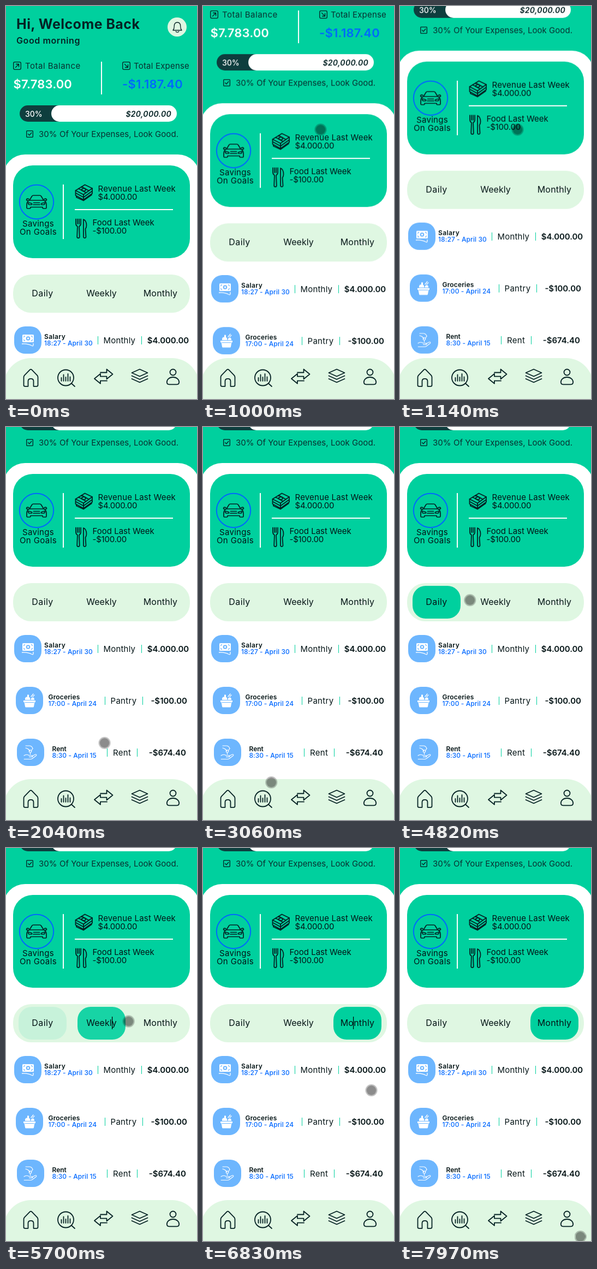
Animation of 350x720 px, one loop 8 s. Source, as an HTML page:

```html
<!DOCTYPE html>
<html lang="en">
<head>
<meta charset="utf-8">
<title>Budget app</title>
<style>
html, body { margin: 0; width: 100%; height: 100%; overflow: hidden; background: #fff; }
svg { display: block; width: 100vw; height: 100vh; }
text { font: 400 15px Inter, "Open Sans", sans-serif; font-optical-sizing: none; fill: #041416; white-space: pre; }
.mid { text-anchor: middle; }
.end { text-anchor: end; }
.semi { font-weight: 600; }
.title { font-size: 25px; font-weight: 700; fill: #052224; }
.sub { font-size: 16px; font-weight: 600; fill: #052224; }
.head { fill: #093030; }
.sum { font-size: 22px; font-weight: 600; fill: #fff; }
.tab { font-size: 16px; }
.name { font-size: 12px; font-weight: 600; }
.date { font-size: 12px; font-weight: 500; fill: #0068ff; }
.line { fill: none; stroke: #052224; stroke-width: 1.8; stroke-linecap: round; stroke-linejoin: round; }
.thin { stroke-width: 1.3; }
.white { stroke: #fff; stroke-width: 1.3; }
.blue { fill: #6db6fe; }
.sep { stroke: #00d09e; stroke-width: 1; }
.rule { stroke: #fff; stroke-width: 2; }
.pick { fill: #00d09e; opacity: 0; }

.page, .pick, .caret, .dot, .dot circle { animation: 8s linear infinite; }
.page { animation-name: scroll; }
.daily { animation-name: daily; }
.weekly { animation-name: weekly; }
.monthly { animation-name: monthly; }
.caret { animation-name: blink; animation-timing-function: step-end; }
.dot { animation-name: move; }
.dot circle { animation-name: show; animation-timing-function: step-end; }

@keyframes scroll {
  0%, 10.9% { transform: translateY(0); }
  11.625% { transform: translateY(-35px); }
  12.5% { transform: translateY(-93px); }
  13.375% { transform: translateY(-150px); }
  14.25% { transform: translateY(-190px); }
  15.125%, 100% { transform: translateY(-206px); }
}
@keyframes daily {
  0% { opacity: 0; }
  51% { opacity: 0; animation-timing-function: cubic-bezier(.215, .61, .355, 1); }
  56% { opacity: 1; }
  68.6% { opacity: 1; animation-timing-function: cubic-bezier(.215, .61, .355, 1); }
  73.6%, 100% { opacity: 0; }
}
@keyframes weekly {
  0% { opacity: 0; }
  68.6% { opacity: 0; animation-timing-function: cubic-bezier(.215, .61, .355, 1); }
  73.6% { opacity: 1; }
  80.9% { opacity: 1; animation-timing-function: cubic-bezier(.215, .61, .355, 1); }
  85.3%, 100% { opacity: 0; }
}
@keyframes monthly {
  0% { opacity: 0; }
  80.9% { opacity: 0; animation-timing-function: cubic-bezier(.215, .61, .355, 1); }
  85.3%, 100% { opacity: 1; }
}
@keyframes blink {
  0% { opacity: 0; transform: translateX(84px); }
  51.3% { opacity: 1; transform: translateX(84px); }
  57.5% { opacity: 0; transform: translateX(84px); }
  63.8% { opacity: 1; transform: translateX(84px); }
  68.6% { opacity: 1; transform: translateX(194px); }
  74.9% { opacity: 0; transform: translateX(194px); }
  80.9% { opacity: 1; transform: translateX(275px); }
  87.1% { opacity: 0; transform: translateX(275px); }
  93.4% { opacity: 1; transform: translateX(275px); }
  99.6%, 100% { opacity: 0; transform: translateX(275px); }
}
@keyframes show {
  0% { opacity: 0; }
  .85%, 100% { opacity: 1; }
}
@keyframes move {
  0% { transform: translate(310.5px, 646.5px); }
  .875% { transform: translate(310.5px, 646.5px); animation-timing-function: ease-in-out; }
  8.375% { transform: translate(215.5px, 226.5px); }
  19.8% { transform: translate(215.5px, 226.5px); animation-timing-function: cubic-bezier(.4, 0, .8, .8); }
  25.5% { transform: translate(181px, 578px); }
  27.6% { transform: translate(115px, 711px); }
  29.9% { transform: translate(11px, 692px); }
  32.5% { transform: translate(3px, 688px); animation-timing-function: ease-in-out; }
  40.1% { transform: translate(142px, 646px); animation-timing-function: ease-in-out; }
  47% { transform: translate(77px, 315px); }
  48.5% { transform: translate(85.5px, 316px); }
  55% { transform: translate(85.5px, 316px); animation-timing-function: ease-in-out; }
  66.9% { transform: translate(192px, 319px); }
  68.6% { transform: translate(194px, 319px); }
  70.4% { transform: translate(221px, 318px); }
  71.25% { transform: translate(224.5px, 317.5px); animation-timing-function: ease-out; }
  79.4% { transform: translate(277px, 320px); }
  81% { transform: translate(277px, 320px); animation-timing-function: ease-in; }
  85.375% { transform: translate(308.5px, 443px); animation-timing-function: ease-out; }
  91.25% { transform: translate(316px, 698px); }
  92% { transform: translate(330px, 709px); }
  92.9% { transform: translate(336px, 714px); }
  93.75%, 98.6% { transform: translate(331.5px, 716px); }
  99.6%, 100% { transform: translate(330.5px, 712px); }
}
</style>
</head>
<body>
<svg viewBox="0 0 350 720">
  <g class="page">
    <rect y="-1" width="350" height="400" fill="#00d09e"/>

    <!-- header -->
    <text class="title" x="19" y="42" letter-spacing=".45">Hi, Welcome Back</text>
    <text class="sub" x="19" y="69" letter-spacing=".6">Good morning</text>
    <circle cx="313.5" cy="38.5" r="17.5" fill="#dff7e2"/>
    <path class="line thin" d="M306 44.5c2-2.2 2.3-4.2 2.3-7.5 0-4.3 2.3-7 5.7-7s5.7 2.7 5.7 7c0 3.300.3 5.300 2.300 7.500zM311.300 46.500c.6 2.200 4.800 2.200 5.400 0"/>

    <g class="line thin">
      <rect x="13.700" y="102.700" width="13.600" height="13.600" rx="2.500"/>
      <path d="M17.500 112.500l6-6M18.500 106.500h5v5"/>
      <rect x="213.700" y="102.700" width="13.600" height="13.600" rx="2.500"/>
      <path d="M217.500 106.500l6 6M218.500 112.500h5v-5"/>
      <rect x="37.700" y="228.700" width="11.600" height="11.600" rx="1"/>
      <path d="M40.500 234.500l2.300 2.300 4-4.500"/>
    </g>
    <text class="head" x="35" y="115" letter-spacing=".5">Total Balance</text>
    <text class="head" x="234" y="115" letter-spacing=".2">Total Expense</text>
    <text class="sum" x="13.500" y="151" letter-spacing=".15">$7.783.00</text>
    <text class="sum" x="213" y="151" letter-spacing=".25" style="fill:#0068ff">-$1.187.40</text>
    <path class="rule" d="M175 102v60"/>

    <rect x="25" y="182" width="120" height="30" rx="15" fill="#0e3e3e"/>
    <rect x="83" y="182" width="230" height="30" rx="15" fill="#fff"/>
    <text x="35" y="203" style="font-size:14px;font-weight:500;fill:#fff">30%</text>
    <text class="end" x="303" y="203" letter-spacing=".3" style="font-size:14px;font-weight:600;font-style:italic;fill:#052224">$20,000.00</text>
    <text class="head" x="60" y="240" letter-spacing=".05">30% Of Your Expenses, Look Good.</text>

    <!-- sheet -->
    <rect x="-5" y="272" width="360" height="760" rx="40" fill="#fff"/>
    <rect x="13" y="292" width="324" height="170" rx="36" fill="#00d09e"/>
    <circle cx="56" cy="359" r="31.200" fill="none" stroke="#0068ff" stroke-width="2"/>
    <g class="line" style="stroke-width:1.700">
      <path d="M43 356l4.500-7.500c.7-1.200 1.500-1.500 2.800-1.500h11.400c1.300 0 2.100.3 2.800 1.500l4.500 7.500M43 356h26M43 356c-4 1.500-5 4-5 8v5.500c0 1 .5 1.500 1.500 1.500h4c1 0 1.500-.6 1.500-1.500v-1h22v1c0 .9.5 1.500 1.500 1.500h4c1 0 1.500-.5 1.500-1.500v-5.500c0-4-1-6.500-5-8"/>
      <path d="M42 354c-2-1.500-4.500-1-4.500 1 0 1 1.500 1.500 3 1.500M70 354c2-1.500 4.500-1 4.500 1 0 1-1.500 1.500-3 1.500M40.500 360l6 1.500c1.500.5 1.500 2.500 0 2.500h-3.500c-1.500 0-2.500-2-2.500-4zM71.500 360l-6 1.500c-1.500.5-1.500 2.500 0 2.500h3.500c1.500 0 2.500-2 2.500-4zM50 364h12M50.500 360.500h11"/>
    </g>
    <text class="mid" x="59" y="404" letter-spacing=".3">Savings</text>
    <text class="mid" x="59" y="419" letter-spacing=".4">On Goals</text>
    <path class="rule" d="M105 327v100M126 373h180"/>

    <g class="line">
      <path d="M127.500 338l17-10.500 13.500 6.500-16 11.500zM133 334.500l13.500 7.500M138.500 331l13.500 7.500"/>
      <ellipse cx="142.500" cy="336.500" rx="3.600" ry="2.400"/>
      <path d="M127.500 338v4.500l14.500 8 16-11.500v-5M127.500 342.500v4.500l14.500 8 16-11.500v-4.500M142 345.500v9.500M129 348v2.500l13 6 15-10.500"/>
      <path d="M128 390.500v8c0 3 1.300 4.500 3 5.500l-.8 18.500c0 3.500 4.600 3.500 4.600 0l-.8-18.500c1.700-1 3-2.500 3-5.500v-8M131 390.500v8.500M134 390.500v8.500M142 391c4 1.500 5.500 6 5.500 11 0 3-.8 5-2 6.500l1 14c.2 3.300-4.700 3.300-4.500 0z"/>
    </g>
    <text x="168.500" y="340" letter-spacing=".2">Revenue Last Week</text>
    <text x="168.500" y="355" letter-spacing="-.2">$4.000.00</text>
    <text x="158.500" y="402">Food Last Week</text>
    <text x="158.500" y="417" letter-spacing="-.2">-$100.00</text>

    <!-- period tabs -->
    <rect x="13" y="492" width="324" height="70" rx="33" fill="#dff7e2"/>
    <rect class="pick daily" x="23" y="497" width="88" height="60" rx="24"/>
    <rect class="pick weekly" x="131" y="497" width="88" height="60" rx="24"/>
    <rect class="pick monthly" x="239" y="497" width="88" height="60" rx="24"/>
    <text class="tab mid" x="67" y="532" letter-spacing=".4">Daily</text>
    <text class="tab mid" x="175" y="532">Weekly</text>
    <text class="tab mid" x="283" y="532" letter-spacing=".2">Monthly</text>
    <rect class="caret" y="515" width="1.200" height="23" fill="#000"/>

    <!-- entries -->
    <g>
      <rect class="blue" x="15" y="587" width="50" height="50" rx="20"/>
      <rect x="30" y="602" width="21" height="14" rx="1.500" fill="#fff"/>
      <circle class="blue" cx="40.500" cy="609" r="3.800"/>
      <circle cx="40.500" cy="609" r="1.800" fill="#fff"/>
      <path class="line" style="stroke:#6db6fe;stroke-width:1.200" d="M32.500 606.500l2-2M48.500 606.500l-2-2M32.500 611.500l2 2M48.500 611.500l-2 2"/>
      <path class="line white" d="M29.500 619c7-.5 12 0 18 3.500 1.500.7 2.500 0 2.500-1.500v-2.500"/>
      <text class="name" x="70" y="610" letter-spacing=".4">Salary</text>
      <text class="date" x="70" y="622" letter-spacing=".08">18:27 - April 30</text>
      <path class="sep" d="M168.500 605v15M248.500 605v15"/>
      <text x="178.500" y="618" letter-spacing=".2">Monthly</text>
      <text class="semi end" x="335" y="618" letter-spacing="-.1">$4.000.00</text>
    </g>
    <g>
      <rect class="blue" x="18" y="682" width="50" height="50" rx="20"/>
      <path d="M32 707h22v3h-1.500l-1.500 8c-.2 1-.8 1.500-1.800 1.500h-12.400c-1 0-1.600-.5-1.800-1.500l-1.500-8h-1.500zM35 706c-.5-4 1.500-6 4-5.500v-4h3v4c2 1 2.500 3 2.500 5.500zM45.500 706c0-3.500 2-5 4-4.500 2 .5 2.500 2 2.500 4.500z" fill="#fff"/>
      <path class="line white" d="M46 700l4-5M49 700l3-3"/>
      <path class="line" style="stroke:#6db6fe;stroke-width:1" d="M35 710.500h16"/>
      <text class="name" x="77.500" y="705" letter-spacing=".15">Groceries</text>
      <text class="date" x="77.500" y="717" letter-spacing=".08">17:00 - April 24</text>
      <path class="sep" d="M181.500 700v15M250.500 700v15"/>
      <text x="191.500" y="713" letter-spacing=".3">Pantry</text>
      <text class="semi end" x="332" y="713">-$100.00</text>
    </g>
    <g>
      <rect class="blue" x="20" y="777" width="50" height="50" rx="20"/>
      <g class="line white" style="stroke-width:1.100">
        <path d="M33 808c4-3 7-2 10 0h4.500c2 0 2 2.500 0 2.500h-5M47.500 809l6-3c2-.8 3.200.8 1.700 2.200l-7 5.300c-1 .8-2 1-3.500 1h-11.500M36 790h6.500c3.500 0 5.500 2 6.500 5M36 794l4 1.500 4 4"/>
        <circle cx="44.500" cy="800" r="2.200"/>
        <path d="M44.500 802.500v3.500M49 795l-2.500 4"/>
      </g>
      <text class="name" x="84.500" y="800">Rent</text>
      <text class="date" x="84.500" y="812" letter-spacing=".05">8:30 - April 15</text>
      <path class="sep" d="M185.500 795v15M240.500 795v15"/>
      <text x="196" y="808" letter-spacing=".3">Rent</text>
      <text class="semi end" x="330" y="808">-$674.40</text>
    </g>
  </g>

  <!-- bottom bar -->
  <rect x="-4" y="645" width="358" height="150" rx="50" fill="#dff7e2"/>
  <g class="line">
    <path d="M32.500 680c0-1.500.6-2.600 1.600-3.600l9.700-10c1-1 2.400-1 3.400 0l9.700 10c1 1 1.600 2.100 1.600 3.600v14.500c0 1.500-.9 2.300-2.300 2.300h-5.700v-9.500c0-2.700-1.900-4.500-5-4.500s-5 1.800-5 4.500v9.500h-5.700c-1.400 0-2.300-.8-2.300-2.300z"/>
    <circle cx="109.500" cy="681" r="14.500"/>
    <path d="M120 691.500l6 5.500M101.500 681v6M105.500 675.500v11.500M109.500 680v7M113.500 674v13M117.500 679.500v7.500"/>
    <path d="M173 671.500h11.500v-6l11 9-11 9v-4.800h-11.500v-5l-11 9 11 9v-5h12"/>
    <path d="M230.500 672l14.500-6.500 14.500 6.500-14.500 6.500zM230.500 677.500l14.500 6.500 14.500-6.500M230.500 683l14.500 6.500 14.500-6.500"/>
    <circle cx="306" cy="671" r="5.500"/>
    <path d="M306 680c-7 0-11.200 4.700-11.200 9 0 2.700 1.500 4.300 4.200 4.300h14c2.700 0 4.200-1.600 4.200-4.300 0-4.300-4.200-9-11.200-9z"/>
  </g>

  <g class="dot">
    <circle r="10" fill="none" stroke="#000" stroke-opacity=".25" stroke-width="2"/>
    <circle r="9" fill="#000" fill-opacity=".45"/>
  </g>
</svg>
</body>
</html>
```
